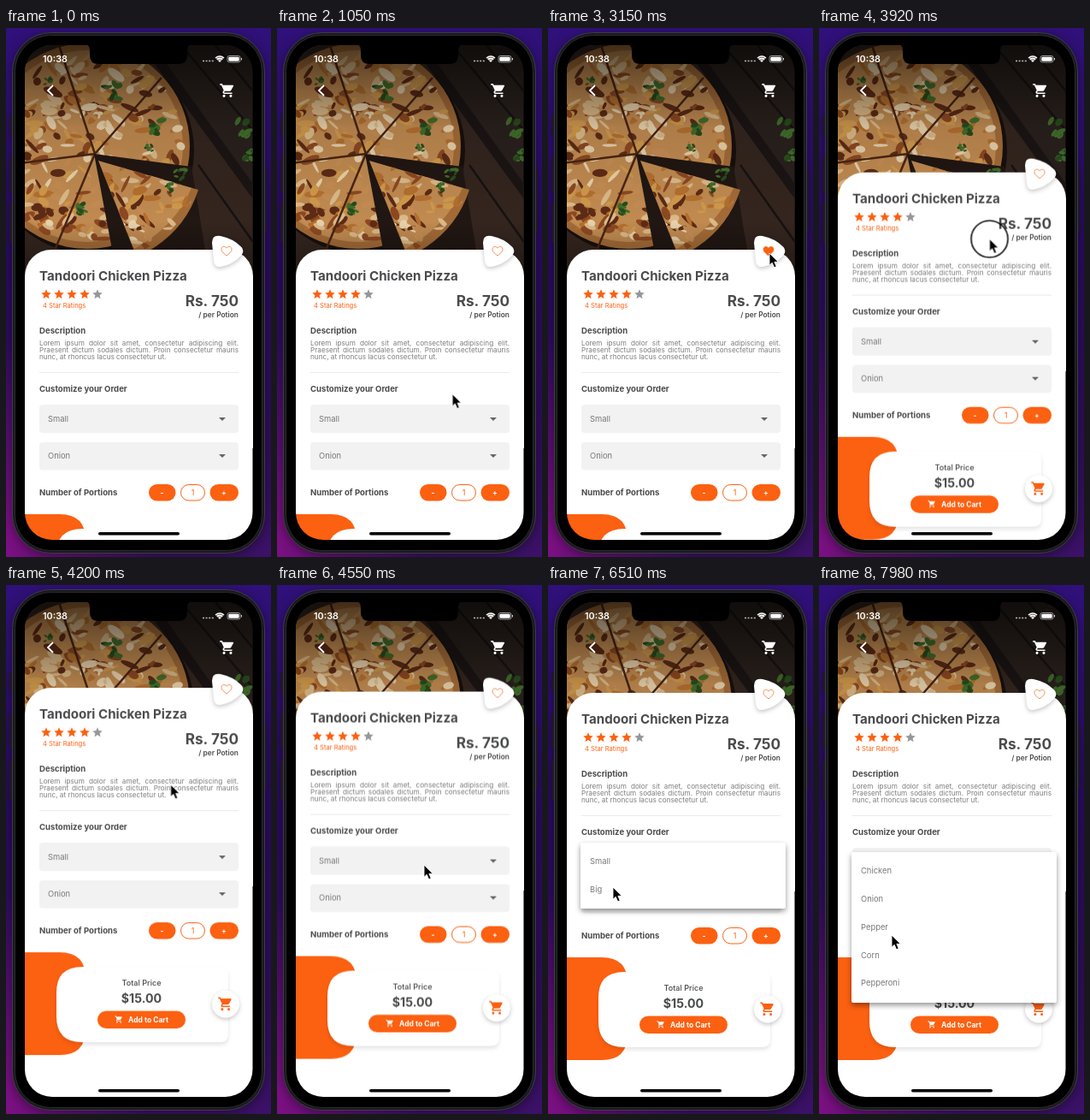
These frames come from a looping animation (310 by 618 pixels, 8 s). An HTML page:

```html
<!DOCTYPE html>
<html lang="en">
<head>
<meta charset="utf-8">
<title>Pizza order screen</title>
<style>
html, body { margin: 0; width: 310px; height: 618px; overflow: hidden; }
body {
  background:
    radial-gradient(ellipse 170px 240px at 0 600px, #7d1083, #7d108300),
    linear-gradient(#30117a, #2a0b5e 45%, #300e5a 80%, #3c1268);
}
svg { display: block; }
text { font-family: Inter, "Open Sans", sans-serif; fill: #4a4b4d; }
.title { font-size: 15.1px; font-weight: 700; }
.price { font-size: 17.2px; font-weight: 700; text-anchor: end; }
.unit { font-size: 8.4px; font-weight: 600; text-anchor: end; }
.head { font-size: 9.6px; font-weight: 700; }
.item { font-size: 9.4px; fill: #77787a; }
.mid { text-anchor: middle; }
.btn { font-size: 8.5px; font-weight: 700; fill: #fff; }
.para { font: 8.2px/8.2px Inter, "Open Sans", sans-serif; color: #7c7d7e; }
.para div { white-space: nowrap; text-align: justify; text-align-last: justify; }
.para div:last-child { text-align-last: left; }
.phone { filter: drop-shadow(0 3px 7px rgba(0, 0, 0, .4)); }
.soft { filter: drop-shadow(0 2px 2.5px rgba(0, 0, 0, .22)); }
.faint { filter: drop-shadow(0 3px 2px rgba(0, 0, 0, .1)); }
.float { filter: drop-shadow(0 3px 3px rgba(0, 0, 0, .42)); }
.orange { fill: #fc6011; }

.scroll { animation: scroll 8s linear infinite; }
.pointer { animation: point 8s ease-in-out infinite; }
.ring { animation: press 8s step-end infinite; }
.liked { animation: like 8s step-end infinite; }
.small { animation: small 8s step-end infinite; }
.big { animation: big 8s step-end infinite; }
.sizes { animation: sizes 8s ease-out infinite; }
.sizes .item { animation: size-text 8s linear infinite; }
.fillings { animation: fillings 8s ease-out infinite; }
.fillings .item { animation: filling-text 8s linear infinite; }

@keyframes scroll {
  0%, 44.5% { transform: translateY(0); }
  49% { transform: translateY(-90px); animation-timing-function: ease-out; }
  52% { transform: translateY(-139px); animation-timing-function: ease-in-out; }
  56.875% { transform: translateY(-134.5px); animation-timing-function: ease-out; }
  60%, 100% { transform: translateY(-133px); }
}
@keyframes point {
  0%, 5% { transform: translate(230px, 640px); }
  19.25%, 21% { transform: translate(190px, 298px); }
  24.5%, 27.2% { transform: translate(257px, 267px); }
  28.9%, 41.1% { transform: translate(259px, 263px); }
  43.5%, 44.5% { transform: translate(205px, 336px); animation-timing-function: linear; }
  49% { transform: translate(199.5px, 246.5px); }
  50.75% { transform: translate(197px, 213px); }
  56.8%, 67.4% { transform: translate(172px, 327px); }
  70%, 75.5% { transform: translate(160px, 324px); }
  80.5%, 87.6% { transform: translate(76px, 353px); }
  91.5%, 94.5% { transform: translate(100px, 367px); }
  99.7%, 100% { transform: translate(85px, 409px); }
}
@keyframes press {
  0% { opacity: 0; }  29% { opacity: 1; }  30.5% { opacity: 0; }
  39.75% { opacity: 1; }  41.1% { opacity: 0; }
  44% { opacity: 1; }  50.75% { opacity: 0; }
  71.75% { opacity: 1; }  73.1% { opacity: 0; }
  86.6% { opacity: 1; }  87.6% { opacity: 0; }
  91.9% { opacity: 1; }  93.1%, 100% { opacity: 0; }
}
@keyframes like { 0% { fill: #fff0; } 30.5% { fill: #fc6011; } 41.1%, 100% { fill: #fff0; } }
@keyframes small { 0% { opacity: 1; } 87.6%, 100% { opacity: 0; } }
@keyframes big { 0% { opacity: 0; } 87.6%, 100% { opacity: 1; } }
@keyframes sizes {
  0%, 73.1% { opacity: 0; clip-path: inset(5px 0 39px); }
  74.1% { opacity: 1; clip-path: inset(5px 0 39px); }
  75.6%, 87.6% { opacity: 1; clip-path: inset(-14px); }
  89.5%, 100% { opacity: 0; clip-path: inset(-14px); }
}
@keyframes size-text { 0%, 74.4% { opacity: 0; } 76.5%, 100% { opacity: 1; } }
@keyframes fillings {
  0%, 93.1% { opacity: 0; clip-path: inset(38px 0 105px); }
  94.1% { opacity: 1; clip-path: inset(38px 0 105px); }
  95.8%, 100% { opacity: 1; clip-path: inset(-14px); }
}
@keyframes filling-text { 0%, 94.5% { opacity: 0; } 96.9%, 100% { opacity: 1; } }
</style>
</head>
<body>
<svg width="310" height="618" viewBox="0 0 310 618">
  <defs>
    <clipPath id="screen"><rect x="22" y="20" width="266.5" height="578" rx="32"/></clipPath>
    <clipPath id="whole"><circle cx="95" cy="138" r="117"/></clipPath>
    <clipPath id="slice"><path d="M108 155L223 188Q206 238 152 264Z"/></clipPath>
    <linearGradient id="shade" x2="0" y2="1">
      <stop stop-opacity=".6"/><stop offset=".35" stop-opacity=".12"/>
      <stop offset=".75" stop-opacity=".02"/><stop offset="1" stop-opacity=".35"/>
    </linearGradient>
    <symbol id="cart" viewBox="0 0 24 24"><path d="M7 18a2 2 0 1 0 0 4 2 2 0 0 0 0-4zM1 2v2h2l3.6 7.6-1.35 2.45C4.5 15.4 5.5 17 7 17h12v-2H7.4c-.2 0-.3-.2-.2-.4l.9-1.6h7.45c.75 0 1.4-.4 1.75-1l3.6-6.5A1 1 0 0 0 20 4H5.2l-.93-2zM17 18a2 2 0 1 0 0 4 2 2 0 0 0 0-4z"/></symbol>
    <path id="star" transform="scale(.87)" d="M0-6.6L1.85-2.2 6.6-1.8 3 1.3 4.1 6 0 3.5-4.1 6-3 1.3-6.6-1.8-1.85-2.2Z"/>
    <path id="arrow" d="M-4-2H4L0 2Z" fill="#666"/>
  </defs>

  <g class="phone">
    <g fill="#1d1826">
      <rect x="4" y="102" width="5" height="23" rx="1.5"/>
      <rect x="4" y="150" width="5" height="41" rx="1.5"/>
      <rect x="4" y="204" width="5" height="47" rx="1.5"/>
      <rect x="301" y="163" width="4" height="76" rx="1.5"/>
    </g>
    <rect x="7.5" y="5.5" width="295" height="608" rx="45" fill="#19191c" stroke="#3f3d44"/>
    <rect x="10.5" y="8.5" width="289" height="602" rx="42" stroke="#2c2b30"/>
  </g>

  <g clip-path="url(#screen)">
    <g id="photo">
      <path d="M22 20H289V295H22Z" fill="#2a211d"/>
      <path d="M22 20H172L289 182V295H22Z" fill="#35261f"/>
      <path d="M172 20L289 182V200L158 20Z" fill="#1b1514"/>
      <path d="M205 20L289 120M245 20L289 74M225 160L289 250" stroke="#171211" stroke-width="2.5"/>
      <circle cx="99" cy="143" r="121" fill="#17100d"/>
      <circle cx="95" cy="138" r="120" fill="#a66d38"/>
      <g id="top" clip-path="url(#whole)"><circle cx="95" cy="138" r="112" fill="#c48d52"/></g>
      <path d="M104 147L62 20M104 147L182 58M104 147L15 158M104 147L56 262" stroke="#4b2614" stroke-width="2.5" fill="none"/>
      <path d="M103 147L217 162 238 290H130Z" fill="#211713"/>
      <path d="M108 155L225 189Q208 242 153 268Z" fill="#a66d38"/>
      <g id="side" clip-path="url(#slice)"><path d="M108 155L217 187Q198 232 150 258Z" fill="#c48d52"/></g>
      <g id="herbs" fill="#42702c"></g>
    </g>
    <path d="M22 20H289V295H22Z" fill="url(#shade)"/>

    <g class="scroll">
      <rect x="22" y="259" width="267" height="520" rx="31" fill="#fff"/>
      <text class="title" x="39" y="295">Tandoori Chicken Pizza</text>
      <g class="orange">
        <use href="#star" x="47" y="311"/><use href="#star" x="62" y="311"/>
        <use href="#star" x="77" y="311"/><use href="#star" x="92" y="311"/>
        <use href="#star" x="107" y="311" fill="#96979a"/>
      </g>
      <text x="43" y="326.7" font-size="7.6" style="fill:#fc6011">4 Star Ratings</text>
      <text class="price" x="272" y="324.6">Rs. 750</text>
      <text class="unit" x="272" y="337.7">/ per Potion</text>
      <text class="head" x="39" y="356.6">Description</text>
      <foreignObject x="39" y="364" width="233" height="30">
        <div class="para" xmlns="http://www.w3.org/1999/xhtml">
          <div>Lorem ipsum dolor sit amet, consectetur adipiscing elit.</div>
          <div>Praesent dictum sodales dictum. Proin consectetur mauris</div>
          <div>nunc, at rhoncus lacus consectetur ut.</div>
        </div>
      </foreignObject>
      <path d="M39 402.5H272" stroke="#ebebeb"/>
      <text class="head" x="39" y="424.7">Customize your Order</text>
      <g fill="#f2f2f2">
        <rect x="39" y="440" width="233" height="33" rx="4"/>
        <rect x="39" y="484" width="233" height="32.5" rx="4"/>
      </g>
      <text class="item small" x="49" y="459.8">Small</text>
      <text class="item big" x="49" y="459.8">Big</text>
      <text class="item" x="49" y="503.2">Onion</text>
      <use href="#arrow" x="253" y="457"/><use href="#arrow" x="253" y="500"/>

      <text class="head" x="39" y="546.4">Number of Portions</text>
      <g class="orange">
        <rect x="167" y="533" width="31.5" height="19.5" rx="9.75"/>
        <rect x="238.5" y="533" width="33.5" height="19.5" rx="9.75"/>
      </g>
      <rect x="204.5" y="533.5" width="28" height="18.5" rx="9.25" fill="#fff" stroke="#fc6011"/>
      <text class="btn mid" x="182.5" y="545.5">-</text>
      <text class="mid" x="218.5" y="546" font-size="9" style="fill:#fc6011">1</text>
      <text class="btn mid" x="255" y="545.8">+</text>

      <path class="orange" d="M22 568H63Q93 568 93 598V658Q93 688 63 688H22Z"/>
      <path class="faint" fill="#fff" d="M89 585H250Q260 585 260 595V664Q260 673 250 673H89Q59 673 59 643V615Q59 585 89 585Z"/>
      <text class="mid" x="158.5" y="606.8" font-size="9.1" font-weight="500">Total Price</text>
      <text class="mid" x="158.5" y="627.3" font-size="14.2" font-weight="700">$15.00</text>
      <rect class="orange" x="107" y="636.5" width="103" height="20.5" rx="10.25"/>
      <use href="#cart" x="127" y="641.5" width="10" height="10" fill="#fff"/>
      <text class="btn" x="143" y="649.7">Add to Cart</text>
      <circle class="soft" cx="257" cy="628.5" r="16" fill="#fff"/>
      <use class="orange" href="#cart" x="247.5" y="619" width="18.5" height="18.5"/>

      <path class="soft" fill="#fff" d="M241 251Q241 241 251 243 266 246 275.5 256 279.5 261 275 266 265 276.5 251 279 244 280 243 272Z"/>
      <path class="liked" fill="none" stroke="#f0702c" stroke-width=".8" d="M258 266C253.500 262.500 252 260.800 252 258.600C252 255 256.200 254.400 258 257.200C259.800 254.400 264 255 264 258.600C264 260.800 262.500 262.500 258 266Z"/>
    </g>

    <g class="sizes">
      <rect class="float" x="38" y="301" width="240" height="77" rx="2" fill="#fff"/>
      <text class="item" x="49" y="326.3">Small</text>
      <text class="item" x="49" y="359.3">Big</text>
    </g>
    <g class="fillings">
      <rect class="float" x="38" y="312" width="240" height="176" rx="2" fill="#fff"/>
      <text class="item" x="49" y="336.5">Chicken</text>
      <text class="item" x="49" y="369.5">Onion</text>
      <text class="item" x="49" y="402.5">Pepper</text>
      <text class="item" x="49" y="435.5">Corn</text>
      <text class="item" x="49" y="468.3">Pepperoni</text>
    </g>

    <path d="M95 20H215Q212 21 212 27V32Q212 42 202 42H108Q98 42 98 32V27Q98 21 95 20Z"/>
    <g fill="#fff">
      <text x="43" y="40" font-size="10.8" font-weight="600" style="fill:#fff">10:38</text>
      <path d="M230 38.5H243" stroke="#bbb" stroke-width="1.6" stroke-dasharray="2 1.6"/>
      <path d="M244.5 34.5Q250 29.8 255.5 34.5L250 40Z"/>
      <path d="M245.5 36Q250 32.4 254.5 36M247.3 37.8Q250 35.8 252.7 37.8" fill="none" stroke="#2a2422" stroke-width=".7"/>
      <rect x="259" y="32.5" width="15" height="7.5" rx="2.2" fill="none" stroke="#bbb" stroke-width=".8"/>
      <rect x="260.3" y="33.8" width="12.4" height="4.9" rx="1.2"/>
      <path d="M275 35h.8v2.5h-.8z"/>
      <path d="M55 67L49 73L55 79" fill="none" stroke="#fff" stroke-width="1.8"/>
      <use href="#cart" x="249.5" y="63.5" width="19" height="19"/>
    </g>
    <rect x="108" y="589" width="95" height="3.5" rx="1.75"/>
  </g>

  <g class="pointer">
    <circle class="ring" r="21.5" fill="none" stroke="#000" stroke-width="1.6"/>
    <path d="M0 0V14.3L3.2 11.3 5.6 16.8 8.2 15.7 5.9 10.3H10.4Z" stroke="#fff" stroke-width=".9"/>
  </g>
</svg>
<script>
const $ = id => document.getElementById(id);
let seed = 11;
const rnd = () => (seed = seed * 16807 % 2147483647) / 2147483647;
const range = (a, b) => a + (b - a) * rnd();

function blob(parent, x, y, rx, ry, fill) {
  const e = document.createElementNS('http://www.w3.org/2000/svg', 'ellipse');
  const spin = `translate(${x} ${y}) rotate(${range(-70, 70)})`;
  Object.entries({ transform: spin, rx, ry, fill })
    .forEach(([k, v]) => v && e.setAttribute(k, v));
  parent.append(e);
}

// Scatter toppings evenly over a disc
function scatter(id, cx, cy, r, count) {
  const tones = ['#8f4a22', '#dfbd8c', '#b8722f', '#ecd5ae', '#d49c4c', '#5f2c16', '#c98f55'];
  for (let i = 0; i < count; i++) {
    const a = range(0, 2 * Math.PI), d = r * Math.sqrt(rnd());
    blob($(id), cx + d * Math.cos(a), cy + d * Math.sin(a),
      range(4, 12), range(1.5, 5), tones[i % tones.length]);
  }
}
scatter('top', 95, 138, 110, 300);
scatter('side', 162, 208, 58, 85);

const herbs = [[125, 74, 12], [174, 117, 13], [88, 211, 9], [204, 171, 8],
  [188, 188, 8], [50, 62, 6], [168, 140, 6], [280, 116, 12], [283, 150, 9]];
for (const [x, y, r] of herbs)
  for (let i = 0; i < 8; i++)
    blob($('herbs'), x + range(-r, r) * .75, y + range(-r, r) * .75,
      r * range(.3, .5), r * range(.15, .3), i % 3 ? '' : '#284d1c');
</script>
</body>
</html>
```
